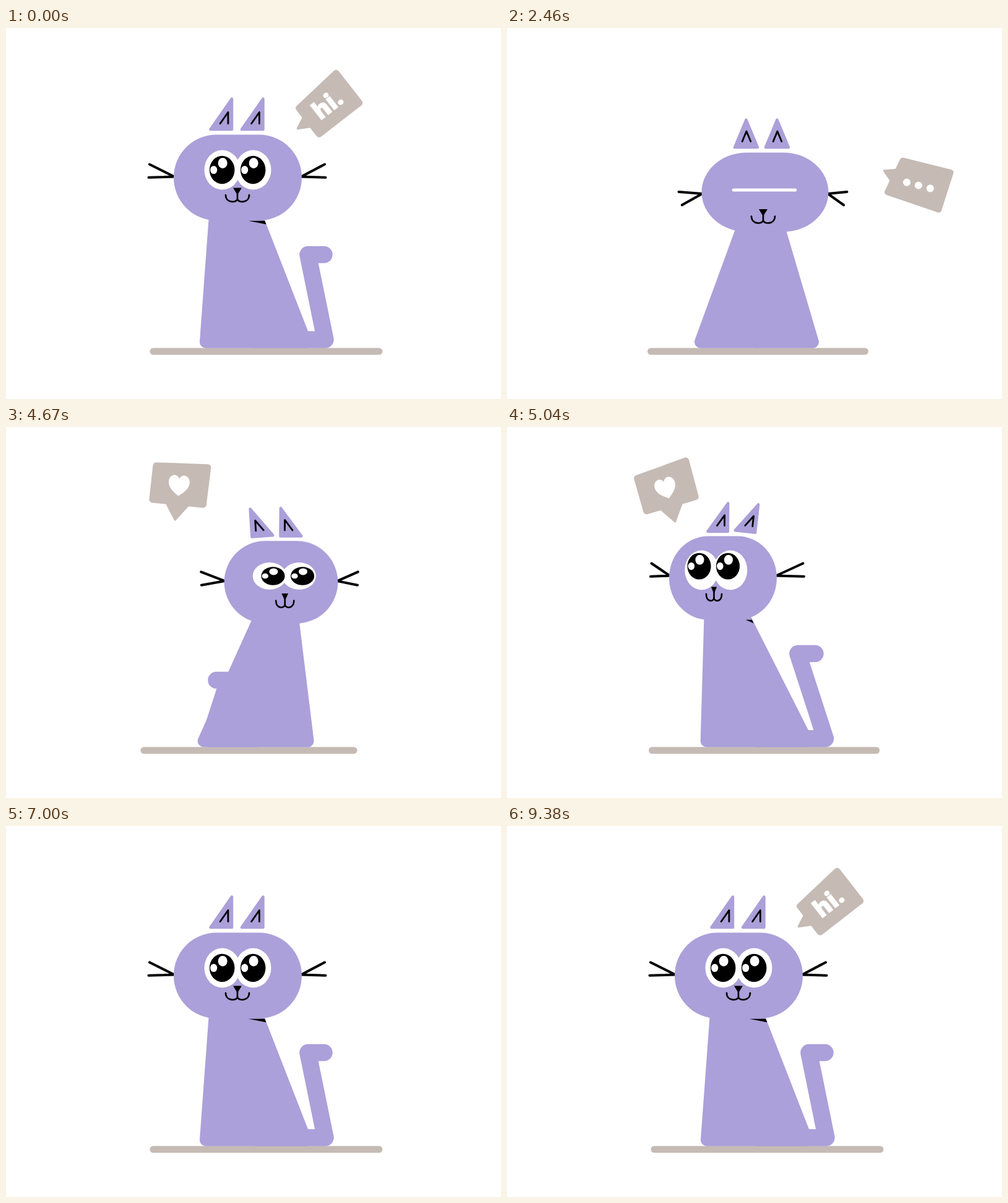
An HTML page that plays this animation: 800 by 600 pixels, repeating every 9.5 s.

```html
<!DOCTYPE html>
<html lang="en">
<head>
<meta charset="utf-8">
<title>Talking cat</title>
<style>
  html, body { margin: 0; width: 100%; height: 100%; overflow: hidden; background: #fff; }
  svg { display: block; width: 800px; height: 600px; }
  text { font: 800 39px "Open Sans", "Noto Sans", sans-serif; fill: #fff; stroke: #fff; stroke-width: 1.2px; }
</style>
</head>
<body>
<svg id="stage" viewBox="0 0 800 600" stroke-linecap="round" stroke-linejoin="round"></svg>
<script>
const LOOP = 9500, FUR = '#aba0d9', SAND = '#c5bab4';
const stage = document.getElementById('stage');

// tail: x, lean, hook, height    head: x, y, width, height, corner
// ears: x, y, width, height, gap, lean, tilt    whiskers: x, y, span, droop
// eyes: x, y, gap, size, openness    mouth: x, y, width
const greeting = {
  floor: [238, 603], neck: [339, 399.3], feet: [323, 484.1],
  tail: [516, -28, 26, 137.5], shade: 27,
  head: [374.5, 241.9, 207, 139, 69.3],
  ears: [373, 164, 34.5, 49.5, 50.5, 1, 0],
  whiskers: [373.5, 240.5, 143, 0],
  eyes: [374.5, 229.5, 50, 1, 1], look: [-.3, 0], mouth: [374, 270, 1]
};
const front = {
  floor: [232.5, 578.5], neck: [392.6, 429.8], feet: [313, 494],
  tail: [404, 0, 0, 0], shade: 0,
  head: [417, 265.5, 205, 128, 73],
  ears: [411.5, 193, 37, 44.5, 50, 0, 0],
  whiskers: [413.5, 268, 137.5, 17],
  eyes: [416, 262, 50, .94, 0], look: [0, 0], mouth: [414, 304.5, 1]
};
// side: 1 looks right, -1 looks left
const sideways = side => ({
  floor: [226.5 - 8 * side, 575.7 - 21 * side],
  neck: [402 + 50.3 * side - 22.7, 402 + 50.3 * side + 22.7], feet: [322.7, 484.7],
  tail: [404.5 - 110 * side, 44.5 * side, -28 * side, 137.5], shade: 12.5 + 2.5 * side,
  head: [403 + 54 * side, 244.2, 174, 135.5, 63.5],
  ears: [406 + 43.2 * side, 169, 32.5, 45.5, 44.3, -.2 - 1.22 * side, -6 * side],
  whiskers: [405.5 + 49.5 * side, 240.5, 124, 0],
  eyes: [401.5 + 63.7 * side, 231.5, 46.5, .94, 1],
  look: [2 + 6 * side, 3.2 * side - 3.2], mouth: [401 + 66.5 * side, 270, .66]
});
const toRight = sideways(1), toLeft = sideways(-1);

function mix(a, b, k) {
  if (typeof a === 'number') return a + (b - a) * k;
  if (Array.isArray(a)) return a.map((v, i) => mix(v, b[i], k));
  return Object.fromEntries(Object.keys(a).map(key => [key, mix(a[key], b[key], k)]));
}

// Eased 0..1 in held steps: the first shows at start, the last at end.
function stepped(t, start, end, steps) {
  if (t < start) return 0;
  if (t >= end) return 1;
  const p = (Math.floor((t - start) / (end - start) * (steps - 1)) + 1) / steps;
  return p * p * (3 - 2 * p);
}

const solid = (points, color, width) =>
  `<polygon points="${points}" fill="${color}" stroke="${color}" stroke-width="${width}"/>`;
const line = (points, color, width) =>
  `<polyline points="${points}" fill="none" stroke="${color}" stroke-width="${width}"/>`;
const oval = (x, y, rx, ry, color) =>
  `<ellipse cx="${x}" cy="${y}" rx="${rx}" ry="${ry}" fill="${color}"/>`;

function drawBody({ floor, neck, feet, tail: [x, lean, hook, height], shade }) {
  const bend = x + lean, top = 504 - height;
  const edge = y => mix(neck[1], feet[1], (y - 290) / 217.5) + 10.7;
  return line([floor[0], 523, floor[1], 523], SAND, 11)
    + line([404, 504, x, 504, bend, top, bend + hook, top], FUR, 27.5)
    + solid([neck[0], 290, neck[1], 290, feet[1], 507.75, feet[0], 507.75], FUR, 20)
    + solid([edge(311) - shade, 311.7, edge(311), 311.7, edge(317), 317.5], '#000', 0);
}

function drawWhiskers([x, y, span, droop], [headX, , headW]) {
  return [-1, 1].map(side => {
    const root = [headX + side * (headW / 2 - 1), y];
    const upper = [x + side * (span - 1.5), y - 20 + droop];
    const lower = [x + side * (span - .4 * droop), y + 1.3 + droop];
    return line([upper, root, lower], '#000', 4);
  }).join('');
}

function drawEars([x, y, width, height, gap, lean, tilt]) {
  const half = width / 2;
  const outer = [[-half, 0], [lean * half, -height], [half, 0]];
  const fold = outer.map(([px, py]) => [px * .37 + lean * 4.3 + .5, py * .37 - 9.5]);
  return [-1, 1].map(side => {
    const angle = side * tilt > 0 ? tilt : 0;
    return `<g transform="translate(${x + side * gap / 2} ${y}) rotate(${angle})">
      ${solid(outer, FUR, 4.5)}${line(fold, '#000', 2.8)}</g>`;
  }).join('');
}

function drawEyes([x, y, gap, size, open], [lookX, lookY]) {
  const centers = [x - gap / 2, x + gap / 2], reach = gap / 2 + 29 * size - 2.5;
  if (open < .1) return line([x - reach, y, x + reach, y], '#fff', 5);
  const pupil = cx => `<g transform="translate(${cx + lookX} ${lookY}) scale(${size})">
    ${oval(0, 0, 20.3, 22.8, '#000')}${oval(1, -11, 7.5, 8.5, '#fff')}${oval(-13.5, 0, 5.6, 6.6, '#fff')}</g>`;
  return `<g transform="translate(0 ${y}) scale(1 ${open})">
    ${centers.map(cx => oval(cx, 0, 29 * size, 32, '#fff')).join('')}${centers.map(pupil).join('')}</g>`;
}

function drawMouth([x, y, width]) {
  return `<g transform="translate(${x} ${y}) scale(${width} 1)">
    <path d="M-7-11.5H7L0 0Z"/>
    <path d="M-19 0C-19 14 0 13 0 6V-3M0 6C0 13 19 14 19 0"
      fill="none" stroke="#000" stroke-width="2.6" vector-effect="non-scaling-stroke"/></g>`;
}

function drawCat(p) {
  const [x, y, w, h, r] = p.head;
  return drawBody(p) + drawWhiskers(p.whiskers, p.head)
    + `<rect x="${x - w / 2}" y="${y - h / 2}" width="${w}" height="${h}" rx="${r}" ry="${h / 2}" fill="${FUR}"/>`
    + drawEars(p.ears) + drawEyes(p.eyes, p.look) + drawMouth(p.mouth);
}

// Corners and pointer are relative to the bubble's anchor.
const hi = {
  box: [2.5, -33.5, 62.5, -90, 100, -42, 35, 8.5],
  pointer: [9, -17, .5, -.5, 24, -4],
  content: '<text transform="translate(37 -13) rotate(-38)">hi.</text>'
};
const dots = {
  box: [-43.5, -30, 44, -44, 50.5, 26, -46.5, 33],
  pointer: [-48, -10, -67, 0, -48, 12],
  content: [-1, 0, 1].map(i => oval(21.5 * i, -3.2 * i, 6.7, 6.7, '#fff')).join('')
};
const heart = {
  box: [-46, -15.5, 32.5, -44, 48, 14.5, -31, 37.5],
  pointer: [25.5, 25.5, 15, 54, -6.5, 35.5],
  content: `<path transform="rotate(-18)" fill="#fff" d="M0 17.5C-6 13-17 6-17-5C-17-12-12-16-8-16
    C-4-16-1-13 0-10C1-13 4-16 8-16C12-16 17-12 17-5C17 6 6 13 0 17.5Z"/>`
};

const drawBubble = ({ box, pointer, content }, [x, y, turn, scale]) =>
  `<g transform="translate(${x} ${y}) rotate(${turn}) scale(${scale})">
    ${solid(box, SAND, 10.5)}${solid(pointer, SAND, 3.5)}${content}</g>`;

// Grows a placement [x, y, turn, scale] out of a point.
const grow = ([x, y, turn, scale], fromX, fromY, k) => [mix(fromX, x, k), mix(fromY, y, k), turn, scale * k];

function drawBubbles(t, turnRight, turnLeft) {
  let out = '';
  if (t < 1960 || t >= 7830) {
    const swing = t < 1960 ? 0 : 1 - stepped(t, 8130, 8250, 2);
    const pop = t < 1960 ? 1 : stepped(t, 7830, 7960, 2);
    out += drawBubble(hi, [471, 163, -15 * swing, pop * (1 + .1 * swing)]);
  }
  if (t >= 1920 && t < 4290) {
    const place = mix([608, 233.5, 0, 1], [665, 254.5, 23, .9], Math.min(1, 2 * turnRight));
    out += drawBubble(dots, grow(place, 541, 233.5, stepped(t, 1920, 2040, 3)));
  }
  if (t >= 4250 && t < 6670) {
    const place = mix([290, 92, 32, 1], [256.5, 98.5, 0, 1], Math.min(1, 2 * turnLeft));
    out += drawBubble(heart, grow(place, 354, 177, stepped(t, 4250, 4380, 3)));
  }
  return out;
}

const through = (from, to, k) => k < .5 ? mix(from, front, 2 * k) : mix(front, to, 2 * k - 1);

function render(t) {
  const turnRight = stepped(t, 2210, 2710, 6);
  const turnLeft = stepped(t, 4540, 5040, 8);
  const turnBack = stepped(t, 6670, 7000, 4);
  const pose = turnBack ? mix(toLeft, greeting, turnBack)
    : turnLeft ? through(toRight, toLeft, turnLeft)
    : through(greeting, toRight, turnRight);
  if (t >= 9290 && t < 9380) pose.eyes[4] = 0;
  stage.innerHTML = drawCat(pose) + drawBubbles(t, turnRight, turnLeft);
}

const begin = performance.now();
function tick() {
  render((performance.now() - begin) % LOOP);
  requestAnimationFrame(tick);
}
tick();
</script>
</body>
</html>
```
